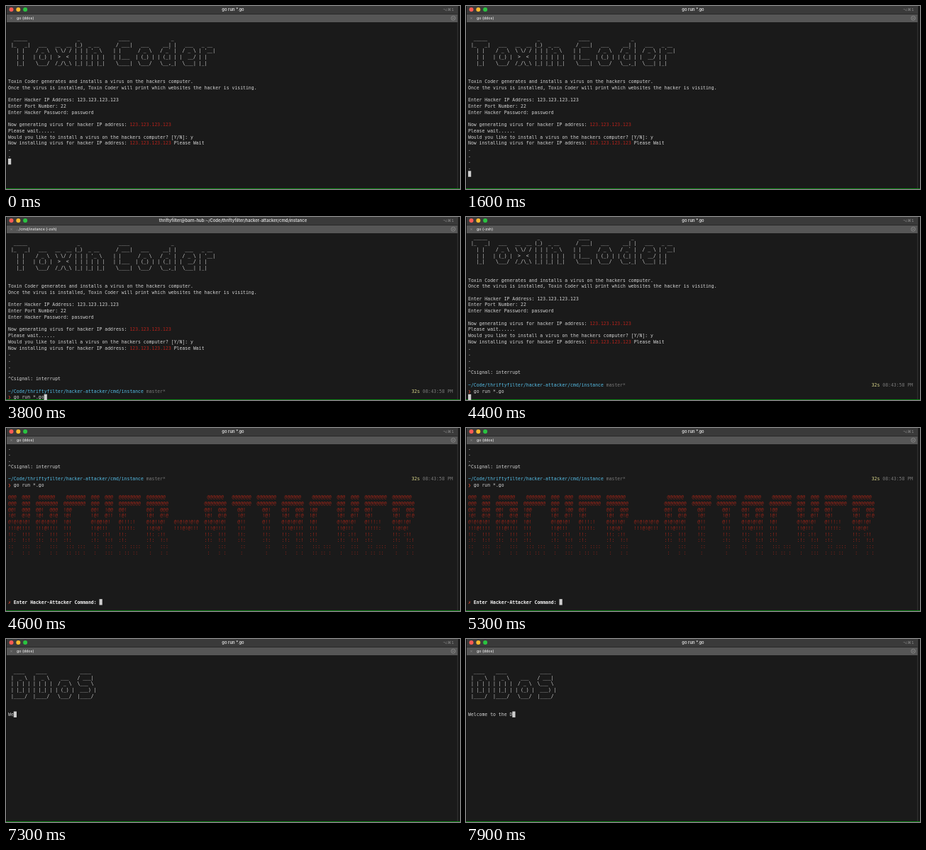
Write an HTML page with a canvas that moves like this. It is 640 px wide and 259 px high and loops after 8000 ms.

```html
<!DOCTYPE html>
<html lang="en">
<head>
<meta charset="utf-8">
<title>Terminal session</title>
<style>
html, body { margin: 0; width: 100%; height: 100%; overflow: hidden; background: #1a1a1a; }
canvas { display: block; width: 640px; height: 259px; }
</style>
</head>
<body>
<canvas id="stage" width="640" height="259"></canvas>
<script>
const ctx = document.getElementById('stage').getContext('2d');
const LOOP = 8000, TICK = 100;
const LEFT = 3, TOP = 28.2, COL = 3.895, ROW = 8.725, ROWS = 27;
const MONO = '"DejaVu Sans Mono", "Liberation Mono", monospace';
const SANS = 'Inter, Roboto, sans-serif';
const INK = '#d2d2d2', WHITE = '#f4f4f4', DIM = '#777777', RED = '#b3221b',
      BLOOD = '#9c2519', CYAN = '#55bde6', YELLOW = '#d9d58a', PROMPT = '#d2482f';

const glyphs = {
  T: ['  _____ ', ' |_   _|', '   | |  ', '   | |  ', '   |_|  '],
  o: ['        ', '   ___  ', '  / _ \\ ', ' | (_) |', '  \\___/ '],
  x: ['       ', ' __  __', ' \\ \\/ /', '  >  < ', ' /_/\\_\\'],
  i: ['  _ ', ' (_)', ' | |', ' | |', ' |_|'],
  n: ['        ', '  _ __  ', " | '_ \\ ", ' | | | |', ' |_| |_|'],
  C: ['   ____ ', '  / ___|', ' | |    ', ' | |___ ', '  \\____|'],
  d: ['      _ ', '   __| |', '  / _` |', ' | (_| |', '  \\__,_|'],
  e: ['       ', '   ___ ', '  / _ \\', ' |  __/', '  \\___|'],
  r: ['       ', '  _ __ ', " | '__|", ' | |   ', ' |_|   '],
  D: ['  ____  ', ' |  _ \\ ', ' | | | |', ' | |_| |', ' |____/ '],
  S: ['  ____  ', ' / ___| ', ' \\___ \\ ', '  ___) |', ' |____/ '],
  ' ': ['  ', '  ', '  ', '  ', '  ']
};

// Dripping letters: cell width, then ten rows from top to bottom.
const drips = {
  H: [10, '@@@  @@@|@@@  @@@|@@!  @@@|!@!  @!@|@!@!@!@!|!!!@!!!!|!!:  !!!|:!:  !:!|::   :::| :   : :'],
  A: [10, ' @@@@@@|@@@@@@@@|@@!  @@@|!@!  @!@|@!@!@!@!|!!!@!!!!|!!:  !!!|:!:  !:!|::   :::| :   : :'],
  C: [10, ' @@@@@@@|@@@@@@@@|!@@|!@!|!@!|!!!|:!!|:!:| ::: :::| :: :: :'],
  K: [10, '@@@  @@@|@@@  @@@|@@!  !@@|!@!  @!!|@!@@!@!|!!@!!!|!!: :!!|:!:  !:!| ::  :::| :   :::'],
  E: [10, '@@@@@@@@|@@@@@@@@|@@!|!@!|@!!!:!|!!!!!:|!!:|:!:| :: ::::|: :: ::'],
  R: [10, '@@@@@@@|@@@@@@@@|@@!  @@@|!@!  @!@|@!@!!@!|!!@!@!|!!: :!!|:!:  !:!|::   :::| :   : :'],
  T: [9, '@@@@@@@|@@@@@@@|  @@!|  !@!|  @!!|  !!!|  !!:|  :!:|   ::|   :'],
  '-': [11, '||||@!@!@!@!@|!!!@!@!!!||||']
};

const banner = word => [0, 1, 2, 3, 4].map(r => [...word].map(c => glyphs[c][r]).join(''));

function dripBanner(word) {
  const cells = [...word].map(c => ({ w: drips[c][0], rows: drips[c][1].split('|') }));
  return cells[0].rows.map((_, r) =>
    [[cells.map(c => (c.rows[r] || '').padEnd(c.w)).join(''), BLOOD]]);
}

const HOME = '~/Code/thriftyfilter/hacker-attacker/cmd/instance';
const IP = ['123.123.123.123', RED];
const CMD = 'go run *.go';

const intro = [
  '', '', ...banner('Toxin Coder'), '', '',
  'Toxin Coder generates and installs a virus on the hackers computer.',
  'Once the virus is installed, Toxin Coder will print which websites the hacker is visiting.',
  '',
  'Enter Hacker IP Address: 123.123.123.123',
  'Enter Port Number: 22',
  'Enter Hacker Password: password',
  '',
  [['Now generating virus for hacker IP address: '], IP],
  'Please wait......',
  'Would you like to install a virus on the hackers computer? [Y/N]: y',
  [['Now installing virus for hacker IP address: '], IP, [' Please Wait']],
  '.', '.'
];
const status = [[HOME, CYAN], [(' master*').padEnd(146 - HOME.length), DIM],
                ['32s ', YELLOW], ['08:43:58 PM', DIM]];
const attack = dripBanner('HACKER-ATTACKER');

// Number of characters typed, given the time each one lands.
const typed = (t, times) => times.filter(k => t >= k).length;
const cmdTimes = [...Array(8).keys()].map(i => 2700 + i * 100).concat(3700, 3700, 3800);

function sceneAt(t) {
  if (t >= 7100) {
    const n = Math.max(0, Math.floor((t - 7210) / 43));
    return { title: CMD, tab: 'go (ddos)',
             lines: ['', '', ...banner('DDoS'), '', '', 'Welcome to the DDoS'.slice(0, n)] };
  }
  const lines = [...intro];
  const s = { title: CMD, tab: 'go (ddos)', lines };
  if (t >= 700) lines.push('.');
  if (t >= 1600) lines.push('.');
  if (t < 1900) { lines.push(''); return s; }

  lines.push('^Csignal: interrupt');
  if (t < 2000) { lines.push(''); return s; }

  lines.push('', status, [['❯ ', PROMPT], [CMD.slice(0, typed(t, cmdTimes))]]);
  if (t < 4200) {
    s.title = 'thriftyfilter@barn-hub:' + HOME;
    s.tab = '../cmd/instance (' + (t < 2100 ? 'ddos' : '-zsh') + ')';
    return s;
  }

  lines.push('');
  if (t < 4600) { s.tab = 'go (-zsh)'; return s; }

  const answer = 'ddos'.slice(0, typed(t, [6400, 6500, 6600, 6800]));
  lines.push(...attack, ...Array(7).fill(''),
    [['✗ ', PROMPT], ['Enter Hacker-Attacker Command: ', WHITE, true], [answer]]);
  s.top = 21;
  return s;
}

// Type is set large and scaled down so the advances stay exact.
function text(str, x, y, size, color, family, weight = 400, align = 'left') {
  ctx.save();
  ctx.translate(x, y);
  ctx.scale(size / 100, size / 100);
  ctx.font = `${weight} 100px ${family}`;
  ctx.textAlign = align;
  ctx.fillStyle = color;
  ctx.fillText(str, 0, 0);
  ctx.restore();
}

function box(x, y, w, h, color) {
  ctx.fillStyle = color;
  ctx.fillRect(x, y, w, h);
}

function disc(x, y, r, color) {
  ctx.fillStyle = color;
  ctx.beginPath();
  ctx.arc(x, y, r, 0, 7);
  ctx.fill();
}

function drawChrome(s) {
  box(0, 0, 640, 259, '#1a1a1a');
  box(0, 0, 640, 11, '#3a3a3a');
  box(0, 11, 640, 1, '#2a2a2a');
  box(0, 12, 637, 11, '#565656');
  box(0, 0, 1, 259, '#111111');
  box(637, 0, 3, 259, '#161616');
  box(636.5, 0, 0.7, 258, '#444444');
  box(0, 258, 640, 1, '#0c7d14');
  ['#fb5b53', '#fbbb2f', '#2ac441'].forEach((c, i) => disc(7.5 + i * 9.8, 5, 3, c));
  text(s.title, 320, 7.1, 5.9, '#dedede', SANS, 600, 'center');
  text('⌥⌘1', 631.5, 7, 5.6, '#8a8a8a', '"DejaVu Sans", sans-serif', 400, 'right');
  text('×', 5.6, 19.3, 6, '#8c8c8c', SANS);
  text(s.tab, 15, 19.1, 5.3, '#e4e4e4', SANS, 500);
  ctx.strokeStyle = '#a5a5a5';
  ctx.lineWidth = 0.6;
  ctx.beginPath();
  ctx.arc(630.5, 17.2, 2.9, 0, 7);
  ctx.moveTo(629, 17.2);
  ctx.lineTo(632, 17.2);
  ctx.stroke();
}

function drawLine(line, row) {
  const y = TOP + row * ROW + 2.3;
  let col = 0;
  for (const [str, color = INK, bold] of typeof line === 'string' ? [[line]] : line) {
    text(str, LEFT + col * COL, y, COL / 0.60205, color, MONO, bold ? 700 : 400);
    col += str.length;
  }
  return col;
}

function draw(t) {
  const s = sceneAt(t);
  const top = s.top ?? Math.max(0, s.lines.length - ROWS);
  drawChrome(s);
  let col = 0;
  s.lines.slice(top).forEach((line, row) => { col = drawLine(line, row); });
  const row = s.lines.length - 1 - top;
  box(LEFT + col * COL, TOP + row * ROW - 4.2, COL + 0.3, 8.4, '#cfcfcf');
}

const start = performance.now();
function frame() {
  const t = (performance.now() - start) % LOOP;
  draw(Math.floor(t / TICK) * TICK);
  requestAnimationFrame(frame);
}
frame();
</script>
</body>
</html>
```
